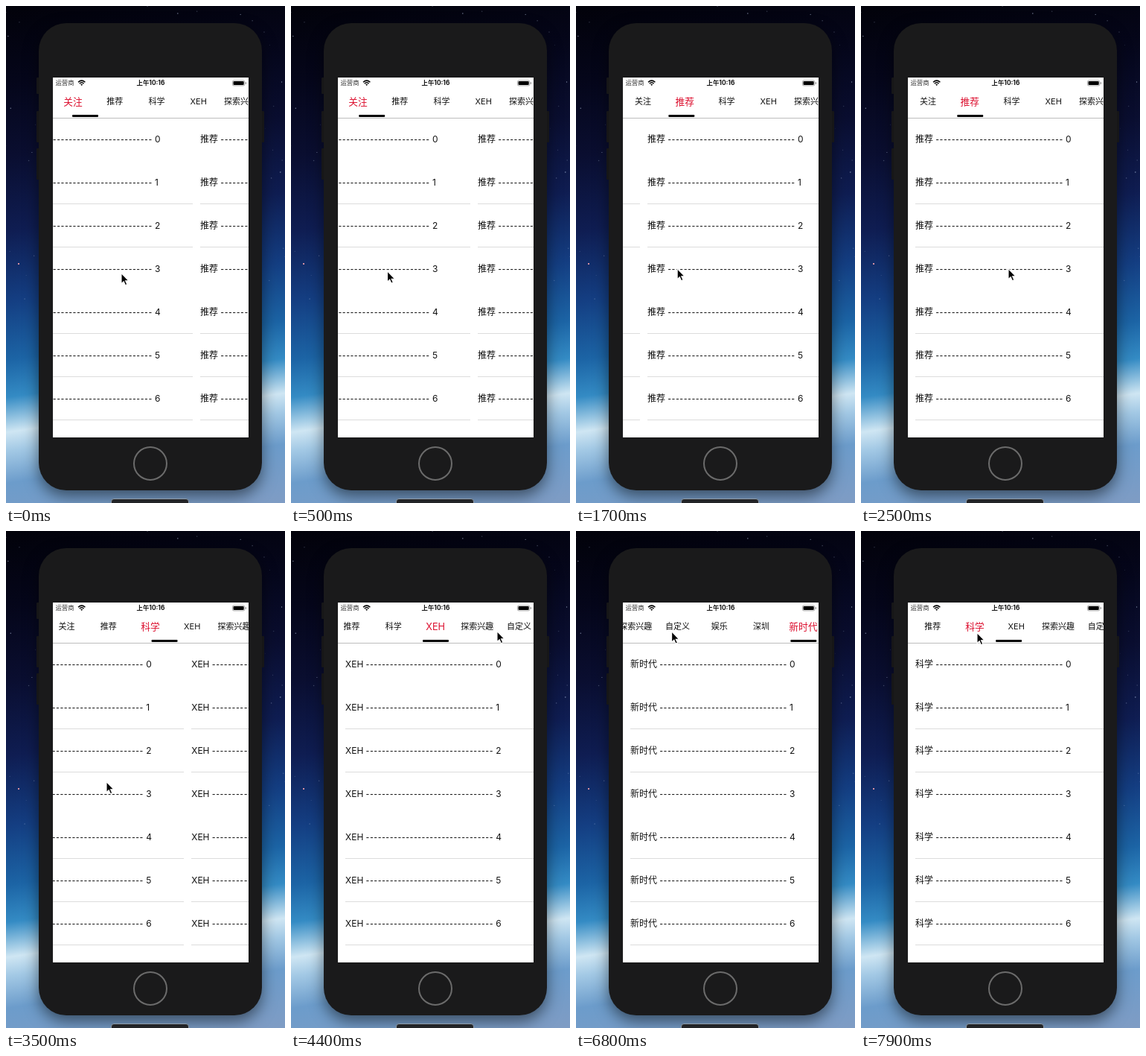
An HTML page with a canvas for the animation above (8000 ms loop, 375 by 667 pixels).

```html
<!DOCTYPE html>
<html lang="zh">
<head>
<meta charset="utf-8">
<title>Tabbed pages</title>
<style>
html, body { margin: 0; width: 100%; height: 100%; overflow: hidden; }
body {
  position: relative;
  font-family: Inter, "Noto Sans CJK SC", "Noto Sans CJK", sans-serif;
  color: #111;
  background: linear-gradient(172deg, #02020a, #05061a 14%, #0a0e30 28%, #0f1d52 42%,
    #143e82 55%, #1c64a5 66%, #348bc4 73%, #cfe6f3 79.5%, #a3c9e5 83%, #6c9ccb 89%, #7f9cc4);
}
#stage { position: absolute; left: 0; top: 0; width: 375px; height: 667px; overflow: hidden; }
#stage div, #stage svg, #stage canvas { position: absolute; }
.body { left: 44px; top: 23px; width: 300px; height: 627px; border-radius: 37px; background: #1a1a1b; box-shadow: 0 8px 20px rgba(0, 0, 0, .5); }
.key { width: 4px; height: 42px; background: #1d1d1f; border-radius: 1px; }
.home { left: 170.5px; top: 591px; width: 42px; height: 42px; border: 2px solid #6b6b6b; border-radius: 50%; }
.dock { left: 141px; top: 661px; width: 103px; height: 20px; border: 1px solid #8d9aa6; border-radius: 4px; background: #232427; }
#screen { left: 62.5px; top: 96px; width: 263.5px; height: 482.5px; background: #fff; overflow: hidden; }
.carrier, .clock { top: 0; line-height: 15px; font-size: 8.4px; white-space: nowrap; }
.carrier { left: 4px; color: #333; }
.clock { left: 0; width: 264px; text-align: center; font-weight: 700; }
#bar { left: 0; top: 15px; width: 100%; height: 39px; border-bottom: 1px solid #bdbdbd; overflow: hidden; }
.tab { top: 0; width: 80px; height: 35px; line-height: 35px; font-size: 11px; text-align: center; white-space: nowrap; }
.tab span { display: inline-block; color: transparent; -webkit-background-clip: text; background-clip: text; }
#line { left: 0; top: 35.3px; width: 35.5px; height: 2.5px; border-radius: 1px; background: #000; }
.page { top: 54px; width: 263.5px; height: 428px; }
.row { left: 10.5px; right: 0; height: 58px; line-height: 58px; font-size: 12px; white-space: nowrap; }
.row:not(:nth-child(3n + 1)), .row:last-child { box-shadow: inset 0 -1px #dcdcdc; }
.dash { font: 13px "Liberation Sans", Arial, sans-serif; letter-spacing: 1.03px; margin: 0 3px 0 3.5px; }
</style>
</head>
<body>
<div id="stage">
  <canvas id="stars" width="375" height="430"></canvas>
  <div class="key" style="left:41px;top:96px;height:22px"></div>
  <div class="key" style="left:41px;top:141px"></div>
  <div class="key" style="left:41px;top:191px"></div>
  <div class="key" style="left:343px;top:141px"></div>
  <div class="body"></div>
  <div class="home"></div>
  <div class="dock"></div>
  <div id="screen">
    <div class="carrier">运营商</div>
    <div class="clock">上午10:16</div>
    <svg width="263" height="15" fill="none" stroke="#000">
      <path d="M34 6.2Q38.7 2 43.4 6.2M35.8 8.1Q38.7 5.5 41.6 8.1" stroke-width="1.5"/>
      <path d="M37.2 9.3Q38.7 8 40.2 9.3L38.7 10.9Z" fill="#000" stroke="none"/>
      <rect x="241.4" y="4" width="16.4" height="7" rx="1.8" stroke="#888" stroke-width=".7"/>
      <rect x="242.5" y="5.1" width="14.2" height="4.8" rx="1" fill="#000" stroke="none"/>
      <path d="M259.3 6.3v2.4" stroke="#777"/>
    </svg>
    <div id="bar"><div id="line"></div></div>
  </div>
  <svg id="cursor" width="14" height="20" viewBox="-1.5 -1.5 14 20">
    <path d="M0 0V14.2L3.2 11.2L5.4 16.2L7.8 15.1L5.6 10.3H10Z" fill="#000" stroke="#fff" stroke-width="1.1"/>
  </svg>
</div>
<script>
const LOOP = 8000, STEP = 100, WIDTH = 263, PITCH = 56.25, FIRST = 27.5;
const TAP_ERA = 5600, TAP_BACK = 7600;
const INK = "#111", RED = "#dc0f2e";
const names = ["关注", "推荐", "科学", "XEH", "探索兴趣", "自定义", "娱乐", "深圳", "新时代", "历史"];

// Where the pointer rests or turns: time, x, y.
const stops = [[0, 155, 358], [1100, 96, 352], [2500, 198, 352], [3000, 103, 345], [3250, 221, 338],
  [3500, 135, 336], [4400, 277, 134], [5600, 236, 131], [7500, 156, 136]];

const $ = id => document.getElementById(id);
const clamp = v => Math.min(1, Math.max(0, v));
const span = (t, from, to) => clamp((t - from) / (to - from));
const ease = (t, from, to) => { const u = span(t, from, to); return u * u * (3 - 2 * u); };
const tabX = i => FIRST + i * PITCH;
const centred = i => tabX(i) - WIDTH / 2;

function pageAt(t) {
  if (t >= TAP_BACK) return 2;
  if (t >= TAP_ERA) return 8;
  return .285 + .715 * span(t, 0, 1800) ** 2.28 + ease(t, 2500, 3100) + ease(t, 3250, 3900);
}

function lineAt(t) {
  if (t < TAP_ERA) return pageAt(t);
  return 3 + 5 * ease(t, TAP_ERA, TAP_ERA + 400) - 6 * ease(t, TAP_BACK, TAP_BACK + 390);
}

function scrollAt(t) {
  const dragged = 299, back = 50;
  return centred(2) * ease(t, 2900, 3100)
    + PITCH * ease(t, 3600, 3900)
    + (dragged - centred(3)) * ease(t, 4400, 5500)
    + (centred(8) - dragged) * ease(t, 5700, 6000)
    + (back - centred(8)) * ease(t, 6300, 7500);
}

function cursorAt(t) {
  const next = stops.findIndex(s => s[0] > t);
  const b = stops[next < 0 ? stops.length - 1 : next];
  const a = next < 0 ? b : stops[next - 1];
  const u = ease(t, a[0], b[0]);
  // Two pulls along the tab bar each way.
  const pull = 60 * (Math.sin(4 * Math.PI * span(t, 6300, 7500)) - Math.sin(4 * Math.PI * span(t, 4400, 5500)));
  return [a[1] + (b[1] - a[1]) * u + pull, a[2] + (b[2] - a[2]) * u];
}

function add(parent, className, html = "") {
  const el = document.createElement("div");
  el.className = className;
  el.innerHTML = html;
  parent.append(el);
  return el;
}

const tabs = names.map(name => add($("bar"), "tab", `<span>${name}</span>`));
const pages = names.map(name => {
  const page = add($("screen"), "page");
  for (let i = 0; i < 7; i++) {
    const row = add(page, "row", `${name}<span class="dash">${"-".repeat(32)}</span>${i}`);
    row.style.top = i * 58 + "px";
  }
  return page;
});

function drawStars() {
  const g = $("stars").getContext("2d");
  let seed = 11;
  const rand = () => (seed = seed * 16807 % 2147483647) / 2147483647;
  for (let i = 0; i < 130; i++) {
    const x = rand() * 375, y = rand() * 420, r = .3 + rand() * .5;
    g.fillStyle = `rgba(190,205,235,${.2 + rand() * .5})`;
    g.beginPath();
    g.arc(x, y, r, 0, 7);
    g.fill();
  }
  g.fillStyle = "#d58fa0";
  g.fillRect(16, 345, 2, 2);
}

function draw(t) {
  const page = pageAt(t), scroll = scrollAt(t);
  const base = Math.floor(page), mix = span(page - base, .33, .67);

  tabs.forEach((tab, i) => {
    const label = tab.firstChild;
    const leaving = i === base, coming = i === base + 1;
    const size = leaving ? 1 - mix : coming ? mix : 0;
    const edge = leaving || coming ? mix * 100 : 0;
    const [left, right] = leaving ? [INK, RED] : [RED, INK];
    tab.style.left = tabX(i) - 40 - scroll + "px";
    label.style.transform = `scale(${1 + .16 * size})`;
    label.style.backgroundImage = `linear-gradient(90deg, ${left} ${edge}%, ${right} ${edge}%)`;
  });
  pages.forEach((el, i) => {
    el.style.left = (i - page) * WIDTH + "px";
    el.style.display = Math.abs(i - page) < 1 ? "" : "none";
  });
  const [x, y] = cursorAt(t);
  $("line").style.transform = `translateX(${tabX(lineAt(t)) - 17.5 - scroll}px)`;
  $("cursor").style.transform = `translate(${x - 1.5}px, ${y - 1}px)`;
}

function tick() {
  const t = performance.now() % LOOP;
  draw(Math.floor(t / STEP) * STEP);
  requestAnimationFrame(tick);
}

drawStars();
tick();
</script>
</body>
</html>
```
